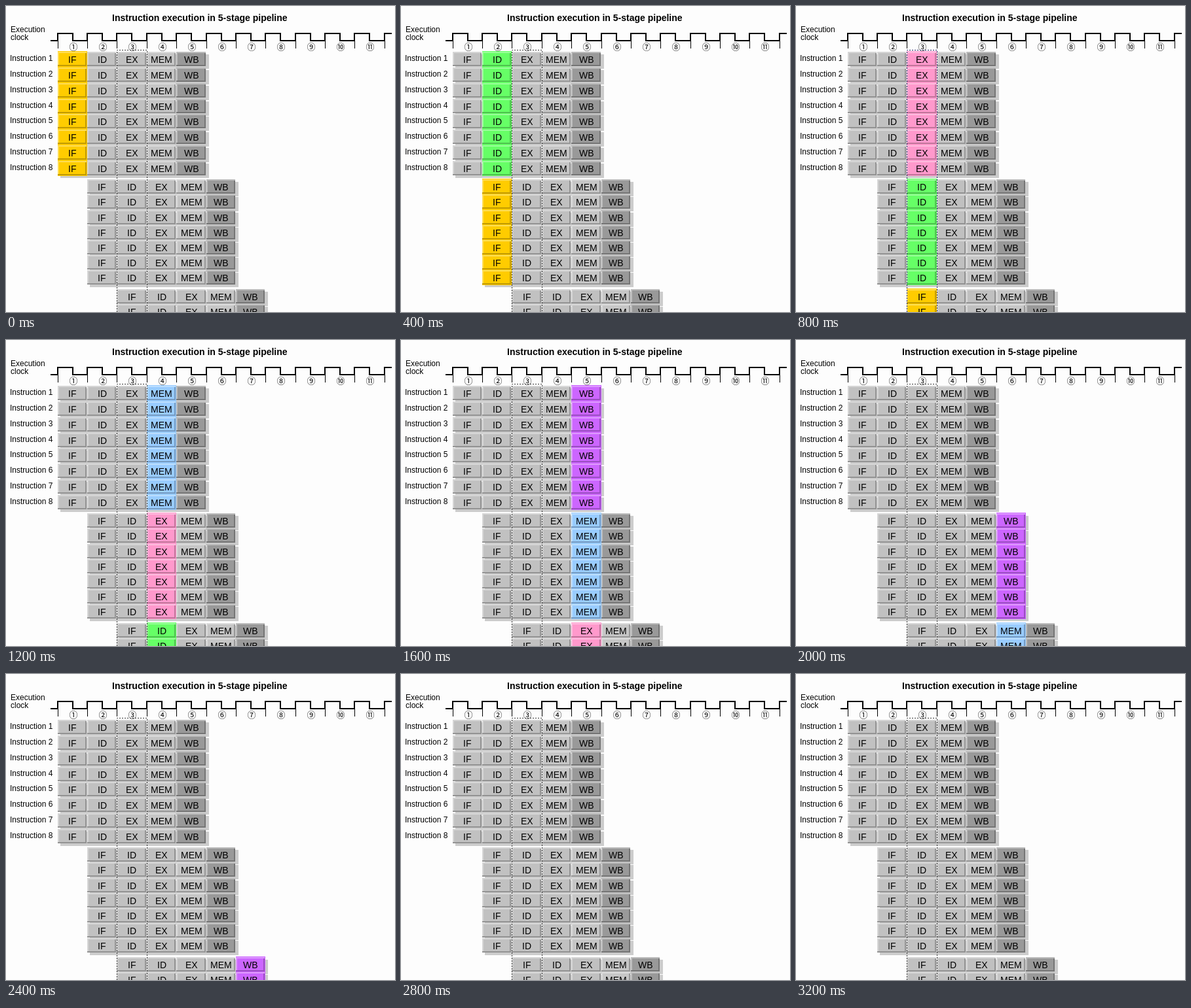
Animation of 594x468 px, one loop 4.4 s. Source, as an HTML page with a canvas:

```html
<!DOCTYPE html>
<html lang="en">
<head>
<meta charset="utf-8">
<title>Five-stage pipeline</title>
<style>
  html, body { margin: 0; width: 100%; height: 100%; overflow: hidden; background: #fdfdfd; }
  canvas { display: block; }
</style>
</head>
<body>
<canvas id="stage" width="594" height="468"></canvas>
<script>
const ctx = document.getElementById('stage').getContext('2d');
const SANS = '"Liberation Sans", Arial, sans-serif';
const STEP = 400, LOOP = 4400;
const LEFT = 79.25, PITCH = 45.35, CELL_HEIGHT = 22;

const stages = [
  { name: 'IF',  idle: '#c1c1c1', lit: '#ffcc00' },
  { name: 'ID',  idle: '#c1c1c1', lit: '#66ff66' },
  { name: 'EX',  idle: '#c0c0c0', lit: '#ff99cc' },
  { name: 'MEM', idle: '#c6c6c6', lit: '#99ccff' },
  { name: 'WB',  idle: '#999999', lit: '#cc66ff' }
];
const groups = [
  { top: 70,    rows: 8, pitch: 23.86 },
  { top: 265.2, rows: 7, pitch: 23.2 },
  { top: 433,   rows: 2, pitch: 23.2 }
];

const columnX = i => Math.floor(LEFT + i * PITCH);

function rect(color, x, y, w, h) {
  ctx.fillStyle = color;
  ctx.fillRect(x, y, w, h);
}

function text(string, x, y, font, align = 'left') {
  ctx.fillStyle = '#000';
  ctx.font = font;
  ctx.textAlign = align;
  ctx.fillText(string, x, y);
}

function centredText(string, x, y, font) {
  ctx.font = font;
  text(string, Math.round(x - ctx.measureText(string).width / 2), y, font);
}

function line(points, width) {
  ctx.lineWidth = width;
  ctx.beginPath();
  points.forEach(([x, y]) => ctx.lineTo(x, y));
  ctx.stroke();
}

function drawClock() {
  const high = 42, low = 53;
  const wave = [[68, low]];
  ctx.strokeStyle = '#000';
  for (let i = 0; i < 12; i++) {
    const x = columnX(i);
    wave.push([x, low], [x, high]);
    line([[x + .5, low], [x + .5, 65]], 1);
    if (i < 11) {
      wave.push([x + 23, high], [x + 23, low]);
      text(String.fromCodePoint(0x2460 + i), x + 24, 66.5,
        '13px "Noto Sans CJK JP", "Noto Sans CJK", sans-serif', 'center');
    }
  }
  wave.push([589, high]);
  line(wave, 2);
}

function drawCell(stage, lit, x, y, w) {
  const light = 'rgba(255,255,255,.34)', dark = 'rgba(0,0,0,.24)';
  const h = CELL_HEIGHT;
  if (lit) rect(stage.lit, x, y - 1, w + 1, h + 2);
  else rect(stage.idle, x, y, w, h);
  rect(light, x, y, w, 2);
  rect(light, x, y + 2, 2, h - 4);
  rect(dark, x, y + h - 2, w, 2);
  rect(dark, x + w - 2, y + 2, 2, h - 4);
  centredText(stage.name, x + w / 2 + .5, y + 17, '14px ' + SANS);
}

function drawGroup(group, g, step) {
  const x = columnX(g), right = columnX(g + 5);
  for (let row = 0; row < group.rows; row++) {
    const y = Math.round(group.top + row * group.pitch);
    rect('#cccccc', x + 4, y + 4, right - x, CELL_HEIGHT);
    stages.forEach((stage, s) => {
      const cellX = columnX(g + s);
      drawCell(stage, s + g === step, cellX, y, columnX(g + s + 1) - cellX - 1);
    });
  }
}

function drawFocusColumn(step) {
  ctx.strokeStyle = step === 2 ? '#222266' : '#333333';
  ctx.setLineDash([2, 2]);
  line([[169.5, 468], [169.5, 67.5], [215.5, 67.5], [215.5, 468]], 1);
  ctx.setLineDash([]);
}

function draw(now) {
  const step = Math.floor((now % LOOP) / STEP);
  rect('#fdfdfd', 0, 0, 594, 468);
  text('Instruction execution in 5-stage pipeline', 162, 23, 'bold 14px ' + SANS);
  text('Execution', 7, 40, '12px ' + SANS);
  text('clock', 7, 52, '12px ' + SANS);
  for (let i = 0; i < 8; i++) {
    text('Instruction ' + (i + 1), 6, Math.round(84 + i * 23.86), '12px ' + SANS);
  }
  drawClock();
  groups.forEach((group, g) => drawGroup(group, g, step));
  drawFocusColumn(step);
}

const start = performance.now();
function tick() {
  draw(performance.now() - start);
  requestAnimationFrame(tick);
}
tick();
</script>
</body>
</html>
```
